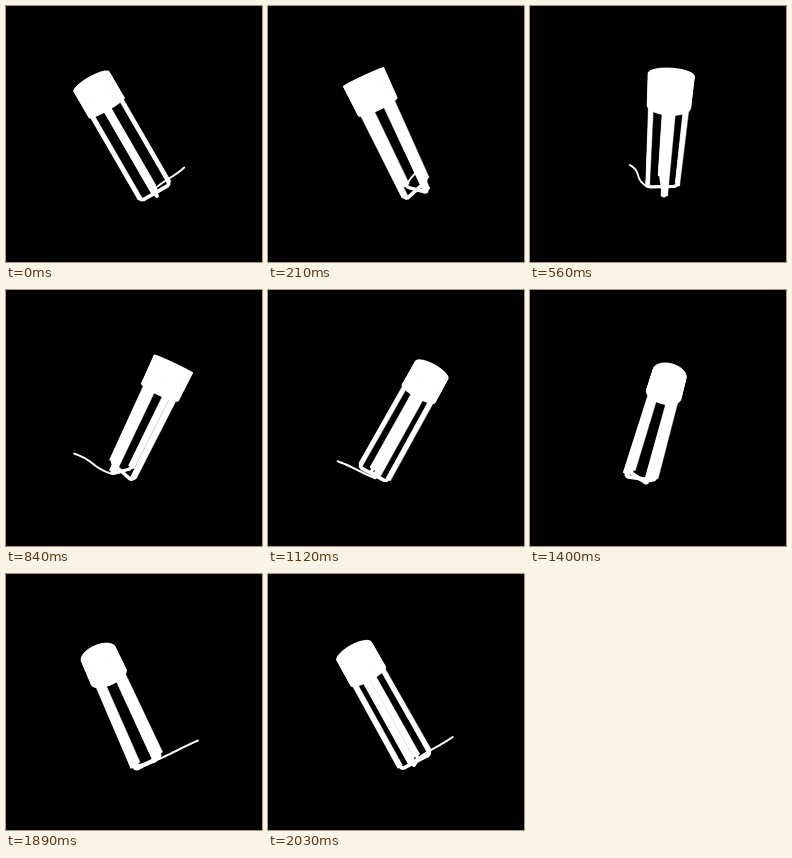
Recreate the animation shown at these times as an HTML page with a canvas. Size 256x256 px, loop 2.1 s.

```html
<!DOCTYPE html>
<html>
<head>
<meta charset="utf-8">
<style>
html, body { margin: 0; width: 100%; height: 100%; overflow: hidden; background: #000; }
canvas { display: block; width: 256px; height: 256px; }
</style>
</head>
<body>
<canvas id="stage" width="256" height="256"></canvas>
<script>
const ctx = document.getElementById('stage').getContext('2d');
const LOOP = 2100, STEP = 70;
const TILT = Math.PI / 6, DIST = 260, CX = 127.5, CY = 129;
const FOOT = [21.5, -56, 7.5];
const LEG_R = 16.2, LEG_WIDE = 6, LEG_DEEP = 3.4, BEND = 3;
const SHADE_R = 19.5, SHADE_LOW = 95, SHADE_TOP = 124;
const sinT = Math.sin(TILT), cosT = Math.cos(TILT);
let turn = 0;

// a and b lie in the base plane, h runs along the lamp's axis
function project(a, b, h) {
  const x = FOOT[0] + a * cosT - h * sinT;
  const y = FOOT[1] + a * sinT + h * cosT;
  const z = FOOT[2] + b;
  const c = Math.cos(turn), s = Math.sin(turn);
  const k = DIST / (DIST - (z * c - x * s));
  return [CX + (x * c + z * s) * k, CY - y * k, k];
}

function trace(points, close) {
  ctx.beginPath();
  points.forEach(p => ctx.lineTo(p[0], p[1]));
  if (close) ctx.closePath();
}

function line(points, width) {
  trace(points);
  ctx.lineWidth = width * points[0][2];
  ctx.stroke();
}

function fill(points) {
  trace(points, true);
  ctx.fill();
  ctx.lineWidth = 0.4;
  ctx.stroke();
}

// solid between two outlines with the same number of corners
function prism(low, top) {
  fill(low);
  fill(top);
  low.forEach((p, i) => {
    const j = (i + 1) % low.length;
    fill([p, low[j], top[j], top[i]]);
  });
}

function rim(h) {
  return Array.from({ length: 48 }, (_, i) => {
    const t = i * Math.PI / 24;
    return project(SHADE_R * Math.cos(t), SHADE_R * Math.sin(t), h);
  });
}

// flat strip, broad side facing outward, bent inward at the base
function drawLeg(angle) {
  const c = Math.cos(angle), s = Math.sin(angle);
  const at = (r, w, h) => project(r * c - w * s, r * s + w * c, h);
  const section = h => [[-1, -1], [1, -1], [1, 1], [-1, 1]].map(([i, j]) =>
    at(LEG_R + i * LEG_DEEP / 2, j * LEG_WIDE / 2, h));
  prism(section(BEND), section(SHADE_LOW + 2));
  line([at(LEG_R, 0, BEND), at(LEG_R - 1, 0, 1), at(LEG_R - BEND, 0, 0), at(0, 0, 0)], 3.6);
}

function drawCord() {
  const points = [];
  for (let i = 0; i <= 24; i++) {
    const s = i / 24, w = -2 * Math.sin(s * 2 * Math.PI);
    points.push(project(40 * s + 0.45 * w, -LEG_R - 19 * s + 0.9 * w, 0));
  }
  line(points, 2);
}

function draw(now) {
  turn = Math.floor(now % LOOP / STEP) * STEP / LOOP * 2 * Math.PI;
  ctx.fillStyle = '#000';
  ctx.fillRect(0, 0, 256, 256);
  ctx.fillStyle = ctx.strokeStyle = '#fff';
  ctx.lineCap = ctx.lineJoin = 'round';
  drawCord();
  for (let i = 0; i < 4; i++) drawLeg(i * Math.PI / 2);
  prism(rim(SHADE_LOW), rim(SHADE_TOP));
}

let start = null;
function tick(now) {
  if (start === null) start = now;
  draw(now - start);
  requestAnimationFrame(tick);
}
draw(0);
requestAnimationFrame(tick);
</script>
</body>
</html>
```
